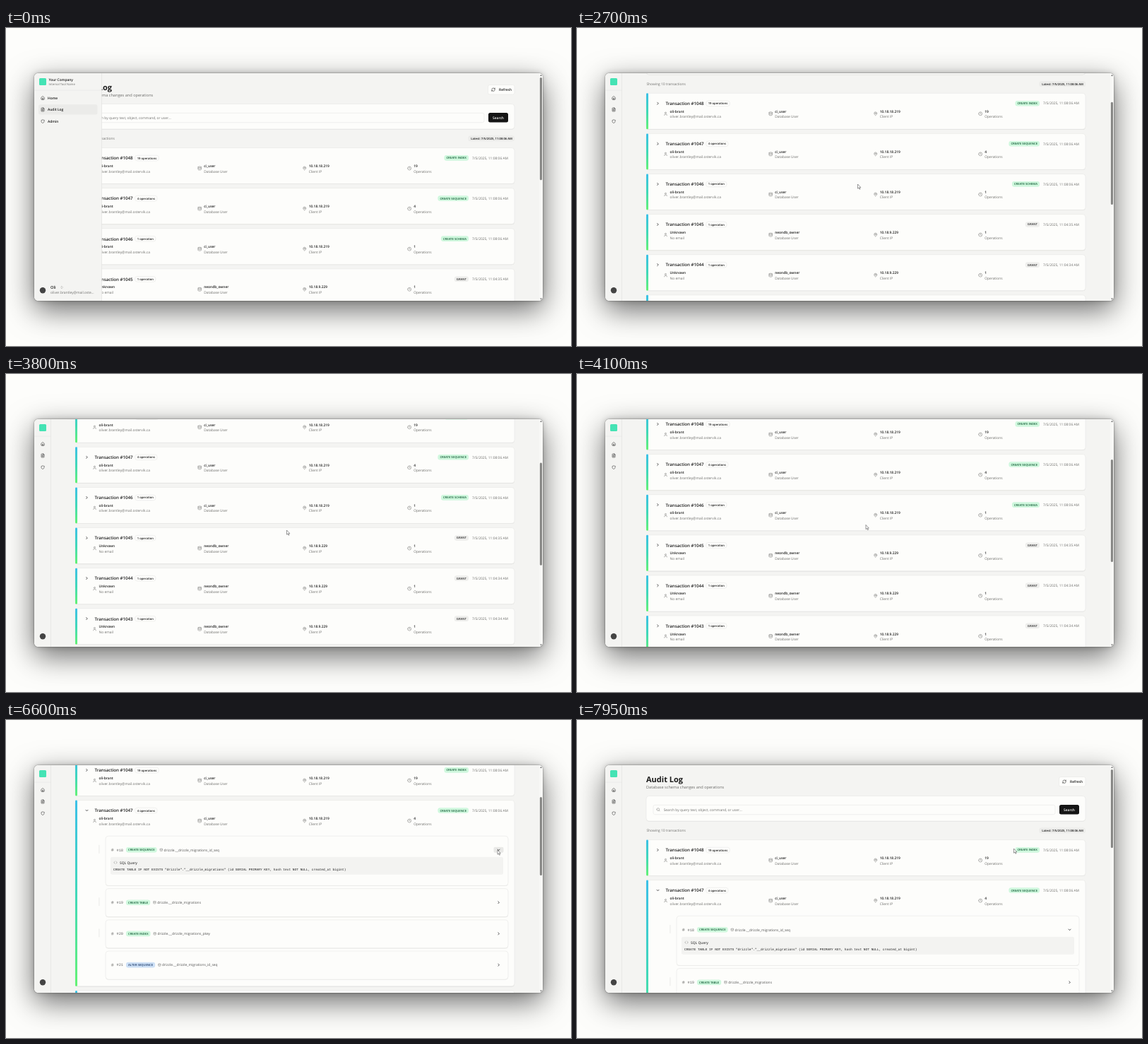
These frames come from a looping animation (800x450 px, 8 s). An HTML page:

```html
<!DOCTYPE html>
<html lang="en">
<head>
<meta charset="utf-8">
<title>Audit Log</title>
<style>
html, body { margin: 0; width: 100%; height: 100%; overflow: hidden; background: #fdfdfb; }
#shadow { position: absolute; left: 40px; top: 64px; width: 720px; height: 322px; border-radius: 6px;
  box-shadow: 0 13px 42px rgba(0,0,0,.58), 0 0 8px rgba(0,0,0,.2), 0 0 2px rgba(0,0,0,.5); }
#stage { position: absolute; left: 0; top: 0; }
text { font-family: "Open Sans", "Noto Sans", sans-serif; text-rendering: geometricPrecision; white-space: pre; }
.mono { font-family: "Liberation Mono", monospace; }
</style>
</head>
<body>
<div id="shadow"></div>
<svg id="stage" width="800" height="450" viewBox="0 0 800 450"></svg>
<script>
const LOOP = 8000, INK = '#1c1c1c', GREY = '#6e6e6c', PAPER = '#fdfdfb', LINE = '#e2e2e0', BG = '#f4f4f2';
const M = 4.9, S = 4.19;                       // body and small text sizes
const TOP = 169.5, PITCH = 57.1, CARD_H = 51;  // transaction cards
const OP_PITCH = 44.2, OPS_H = 182, SQL_H = 30.2;
const EMAIL = 'oliver.brantley@mail.ostervik.ca';
const GREEN = ['#d0f8de', '#17603a'], BLUE = ['#cde0f6', '#23406e'], PLAIN = ['#eeeeec', '#333'];

const ICON = {
  home: 'M3 10a2 2 0 0 1 .7-1.5l7-6a2 2 0 0 1 2.6 0l7 6A2 2 0 0 1 21 10v9a2 2 0 0 1-2 2H5a2 2 0 0 1-2-2zM9 21v-8h6v8',
  file: 'M15 2H6a2 2 0 0 0-2 2v16a2 2 0 0 0 2 2h12a2 2 0 0 0 2-2V7zM14 2v5h6M8 9h2M8 13h8M8 17h8',
  shield: 'M20 13c0 5-3.5 7.5-8 9-4.5-1.5-8-4-8-9V6c3 0 6-1 8-4 2 3 5 4 8 4z',
  user: 'M19 21v-2a4 4 0 0 0-4-4H9a4 4 0 0 0-4 4v2M8 7a4 4 0 1 0 8 0a4 4 0 1 0-8 0',
  db: 'M3 5a9 3 0 1 0 18 0a9 3 0 1 0-18 0V19a9 3 0 0 0 18 0V5M3 12a9 3 0 0 0 18 0',
  pin: 'M20 10c0 5-5.5 10.2-7.4 11.8a1 1 0 0 1-1.2 0C9.5 20.2 4 15 4 10a8 8 0 0 1 16 0M9 10a3 3 0 1 0 6 0a3 3 0 1 0-6 0',
  clock: 'M2 12a10 10 0 1 0 20 0a10 10 0 1 0-20 0M12 6v6l4 2',
  chevron: 'M9 18l6-6-6-6',
  search: 'M3 11a8 8 0 1 0 16 0a8 8 0 1 0-16 0M21 21l-4.3-4.3',
  refresh: 'M3 12a9 9 0 0 1 9-9 9.8 9.8 0 0 1 6.7 2.7L21 8M21 3v5h-5M21 12a9 9 0 0 1-9 9 9.8 9.8 0 0 1-6.7-2.7L3 16M8 16H3v5',
  code: 'M16 18l6-6-6-6M8 6l-6 6 6 6',
  hash: 'M4 9h16M4 15h16M10 3L8 21M16 3l-2 18',
  sort: 'M7 9l5-5 5 5M7 15l5 5 5-5'
};

const pen = document.createElement('canvas').getContext('2d');
function textWidth(s, size, weight) {
  pen.font = `${weight} 100px "Open Sans", "Noto Sans", sans-serif`;
  return pen.measureText(s).width * size / 100;
}
const text = (s, x, y, size = M, weight = 400, fill = INK, more = '') =>
  `<text x="${x}" y="${y}" font-size="${size}" font-weight="${weight}" fill="${fill}" ${more}>${s}</text>`;
const box = (x, y, w, h, r, fill, stroke = 'none', more = '') =>
  `<rect x="${x}" y="${y}" width="${w}" height="${h}" rx="${r}" fill="${fill}" stroke="${stroke}" stroke-width=".5" ${more}/>`;
const icon = (name, x, y, size = 6, color = GREY, id = '') =>
  `<g transform="translate(${x} ${y})"><g ${id && `id="${id}"`}><path transform="scale(${size / 24}) translate(-12 -12)" d="${ICON[name]}"
    fill="none" stroke="${color}" stroke-width="${name === 'chevron' ? 3 : 2}" stroke-linecap="round" stroke-linejoin="round"/></g></g>`;
const panel = (x, y, w, h, id = '') =>
  box(x, y + .6, w, h, 4, 'rgba(0,0,0,.09)', 'none', id && `id="${id}Shade"`) +
  box(x, y, w, h, 4, PAPER, LINE, id && `id="${id}"`);

function pill(s, x, cy, [fill, ink], stroke = 'none') {
  const w = textWidth(s, S, 600) + 6;
  return { w, svg: box(x, cy - 3.8, w, 7.6, 3, fill, stroke) + text(s, x + 3, cy + 1.5, S, 600, ink) };
}

function field(name, x, y, head, sub) {
  return icon(name, x, y + 29, 6) + text(head, x + 6, y + 27.5, M, 600) + text(sub, x + 6, y + 35, M, 400, GREY);
}

function card(i) {
  const y = TOP + PITCH * i, id = 1048 - i, known = i < 3, count = [19, 4][i] || 1;
  const kind = ['CREATE INDEX', 'CREATE SEQUENCE', 'CREATE SCHEMA'][i] || 'GRANT';
  const date = '7/5/2025, ' + (known ? '11:08:06' : i === 3 ? '11:04:35' : '11:04:34') + ' AM';
  const title = 'Transaction #' + id, open = i === 1;
  const kindX = 655 - textWidth(kind, S, 600) - 6;
  return panel(98, y, 622, CARD_H, open ? 'card' : '') +
    box(98, y, 3, CARD_H, 1.4, 'url(#edge)', 'none', open ? 'id="cardEdge"' : '') +
    icon('chevron', 114.5, y + 14.4, 6, INK, open ? 'cardChevron' : '') +
    text(title, 125.5, y + 16.8, 6.15, 600) +
    pill(count + ' operation' + (count > 1 ? 's' : ''), 128.5 + textWidth(title, 6.15, 600), y + 14.5, [PAPER, INK], LINE).svg +
    pill(kind, kindX, y + 14.4, known ? GREEN : PLAIN).svg +
    text(date, 711, y + 16.2, M, 400, GREY, 'text-anchor="end"') +
    field('user', 125.5, y, known ? 'oli-brant' : 'Unknown', known ? EMAIL : 'No email') +
    field('db', 274.2, y, known ? 'ci_user' : 'neondb_owner', 'Database User') +
    field('pin', 422.7, y, known ? '10.18.18.219' : '10.18.9.229', 'Client IP') +
    field('clock', 571.2, y, count, 'Operations');
}

function operation(i, kind, target) {
  const y = TOP + PITCH + 50.6 + OP_PITCH * i, c = y + 19.6, first = i === 0;
  const tag = pill(kind, 170, c, kind[1] === 'L' ? BLUE : GREEN);
  return (i < 3 ? box(131.7, c - 7, .5, 12, 0, '#d8d8d6') : '') +
    panel(141, y, 570, 40, first ? 'op' : '') +
    (first ? box(690.5, c - 4, 14, 8, 2, '#e9e9e7', 'none', 'id="hover"') : '') +
    icon('hash', 150.7, c, 4.5) + text('#' + (18 + i), 156.5, c + 1.7, 5.25, 400, '#666', 'class="mono"') +
    tag.svg + icon('db', 170 + tag.w + 6.2, c, 4.5) +
    text('drizzle.__drizzle_' + target, 170 + tag.w + 10, c + 1.7, M, 400, '#555') +
    icon('chevron', 697.6, c, 6, INK, first ? 'opChevron' : '');
}

function sqlPanel() {
  const y = TOP + PITCH + 50.6;
  return '<g id="sql">' + box(148, y + 29.5, 556, 25, 2.5, '#f3f3f1') + icon('code', 155, y + 37.5, 5.5) +
    text('SQL Query', 161, y + 39.3, M, 600, '#444') +
    text('CREATE TABLE IF NOT EXISTS "drizzle"."__drizzle_migrations" (id SERIAL PRIMARY KEY, hash text NOT NULL, created_at bigint)',
      152, y + 48.4, 4.5, 400, INK, 'class="mono"') + '</g>';
}

function header() {
  return text('Audit Log', 98, 88, 11, 700) +
    text('Database schema changes and operations', 98, 96.5, 5.6, 400, GREY) +
    box(682.5, 80.5, 37.5, 13.5, 2.5, PAPER, LINE) + icon('refresh', 690, 87.2, 6, INK) + text('Refresh', 698, 89, M, 600) +
    panel(98, 107.5, 622, 35.5) + box(108, 120.3, 569, 13.4, 2.5, PAPER, LINE) + icon('search', 115, 126.8, 5.6) +
    text('Search by query text, object, command, or user...', 122.7, 128.8, M, 400, GREY) +
    box(683, 120, 28, 13.5, 2.5, '#151515') + text('Search', 697, 128.7, M, 600, PAPER, 'text-anchor="middle"') +
    text('Showing 10 transactions', 98.4, 158, M, 400, GREY) +
    box(654.5, 152.4, 65.5, 7.8, 2.5, '#ececea') +
    text('Latest: 7/5/2025, 11:08:06 AM', 717, 157.8, S, 600, INK, 'text-anchor="end"');
}

function sidebar() {
  const nav = [['home', 'Home', 99], ['file', 'Audit Log', 115.5], ['shield', 'Admin', 132]];
  return '<svg id="side" x="40" y="64" height="322"><g transform="translate(-40 -64)">' +
    box(40, 64, 100, 322, 0, BG) + box(40, 87.8, 100, .5, 0, LINE) +
    '<g class="label">' + box(46, 108.3, 83.5, 14.3, 2.5, '#ebebe9') + '</g>' +
    box(47, 71, 10, 10, 1.5, '#45e3b4') + '<circle cx="52" cy="371.2" r="4.2" fill="#444"/>' +
    nav.map(([n, , y]) => icon(n, 52, y, 6, INK)).join('') +
    '<g class="label">' + nav.map(([, s, y]) => text(s, 59, y + 1.8, M, 600)).join('') +
    text('Your Company', 60.5, 75.2, M, 600) + text('Internal Tool Name', 60.5, 81.3, S, 400, GREY) +
    text('Oli', 63, 369.3, 5.6, 600) + icon('sort', 79, 367, 5) +
    text(EMAIL.slice(0, 25) + '…', 63, 375.8, M, 400, GREY) + '</g></g></svg>' +
    box(0, 64, .5, 322, 0, '#dcdcda', 'none', 'id="sideEdge"');
}

const range = (a, b) => Array.from({ length: b - a }, (_, i) => a + i);
document.getElementById('stage').innerHTML =
  `<defs><linearGradient id="edge" x2="0" y2="1"><stop stop-color="#3cc0e8"/><stop offset=".5" stop-color="#40d8ba"/>
    <stop offset="1" stop-color="#64f274"/></linearGradient>
    <clipPath id="frame">${box(40, 64, 720, 322, 6, '#000')}</clipPath></defs>
  <g clip-path="url(#frame)">${box(40, 64, 720, 322, 0, BG)}
    <g id="page">${header()}${card(0)}${card(1)}
      <svg id="ops" x="0" y="${TOP + PITCH + 48}" width="800"><g transform="translate(0 ${-(TOP + PITCH + 48)})">
        ${operation(0, 'CREATE SEQUENCE', 'migrations_id_seq')}${sqlPanel()}
        <g id="opTail">${operation(1, 'CREATE TABLE', 'migrations')}${operation(2, 'CREATE INDEX', 'migrations_pkey')}
        ${operation(3, 'ALTER SEQUENCE', 'migrations_id_seq')}</g></g></svg>
      <g id="rest">${range(2, 10).map(card).join('')}</g>
    </g>
    ${sidebar()}
    ${box(755, 64, 5, 322, 0, '#f8f8f6')}<path d="M756 68l1.5-2 1.5 2zM756 382.5l1.5 2 1.5-2z" fill="#777"/>
    ${box(755.9, 70, 3.1, 100, 1.5, '#868684', 'none', 'id="thumb"')}
  </g>
  <g id="cursor" stroke="#555" stroke-width=".6" stroke-linejoin="round" fill="#fff">
    <path id="arrow" d="M0 0V6.2L1.5 4.9L2.5 7.2L3.5 6.8L2.5 4.6H4.3Z"/>
    <path id="hand" d="M-.6 .6a.6 .6 0 0 1 1.2 0V3l2.2 .5q.9 .3 .7 1.2L3 7H-.2L-2.2 4.4q0-.9 .8-.7L-.6 4.2Z"/>
  </g>`;

const $ = id => document.getElementById(id);
const set = (id, name, value) => $(id).setAttribute(name, value);
const labels = document.querySelectorAll('.label');

function ramp(t, from, to) {
  const p = Math.min(1, Math.max(0, (t - from) / (to - from)));
  return p * p * (3 - 2 * p);
}

// Smooth curve through [time, value...] keys that never overshoots them.
function follow(keys, t, k = 1) {
  const n = keys.length - 1;
  if (t <= keys[0][0]) return keys[0][k];
  if (t >= keys[n][0]) return keys[n][k];
  const i = keys.findIndex(key => key[0] > t) - 1;
  const slope = j => (keys[j + 1][k] - keys[j][k]) / (keys[j + 1][0] - keys[j][0]);
  const tangent = j => {
    if (j < 1 || j >= n) return 0;
    const a = slope(j - 1), b = slope(j);
    return a * b > 0 ? 2 * a * b / (a + b) : 0;
  };
  const h = keys[i + 1][0] - keys[i][0], u = (t - keys[i][0]) / h, v = 1 - u;
  return keys[i][k] * v * v * (1 + 2 * u) + keys[i + 1][k] * u * u * (3 - 2 * u) +
    h * u * v * (tangent(i) * v - tangent(i + 1) * u);
}

const SCROLL = [[2510, 0], [2700, 77], [3100, 131.5], [3300, 150], [3520, 150], [3950, 113], [7430, 113], [7740, 0]];
const POINTER = [[2300, 397.5, 221], [3900, 397.5, 221], [4100, 409, 213.5], [4350, 396, 207], [4800, 114.5, 128.5],
  [5220, 114.5, 128.5], [5600, 205.5, 181], [6050, 646, 186], [6250, 696, 184], [6950, 696, 184],
  [7400, 695.2, 189.3], [7750, 688, 186], [7950, 618.5, 182]];

function draw(t) {
  const folded = ramp(t, 1730, 2100), open = ramp(t, 4900, 5150), detail = ramp(t, 6380, 6600);
  const scroll = follow(SCROLL, t), extra = OPS_H * open + SQL_H * detail;

  const width = 95.5 - 72 * folded;
  set('side', 'width', width);
  set('sideEdge', 'x', 40 + width - .5);
  labels.forEach(g => g.setAttribute('opacity', 1 - folded));

  set('page', 'transform', `translate(0 ${-scroll})`);
  for (const id of ['card', 'cardShade', 'cardEdge']) set(id, 'height', CARD_H + extra);
  set('ops', 'height', extra);
  set('ops', 'opacity', open);
  set('rest', 'transform', `translate(0 ${extra})`);
  for (const id of ['op', 'opShade']) set(id, 'height', 40 + SQL_H * detail);
  set('opTail', 'transform', `translate(0 ${SQL_H * detail})`);
  set('sql', 'opacity', detail);
  set('cardChevron', 'transform', `rotate(${90 * open})`);
  set('opChevron', 'transform', `rotate(${90 * detail})`);
  set('hover', 'opacity', t > 6150 && t < 7450 ? 1 : 0);

  const ratio = 311 / (690 + extra);
  set('thumb', 'y', 70 + scroll * ratio);
  set('thumb', 'height', 322 * ratio);

  const hand = t > 4700 && t < 6500;
  set('cursor', 'visibility', t < 2300 ? 'hidden' : 'visible');
  set('cursor', 'transform', `translate(${follow(POINTER, t)} ${follow(POINTER, t, 2)})`);
  set('arrow', 'opacity', hand ? 0 : 1);
  set('hand', 'opacity', hand ? 1 : 0);
}

const start = performance.now();
function tick() {
  draw((performance.now() - start) % LOOP);
  requestAnimationFrame(tick);
}
tick();
</script>
</body>
</html>
```
